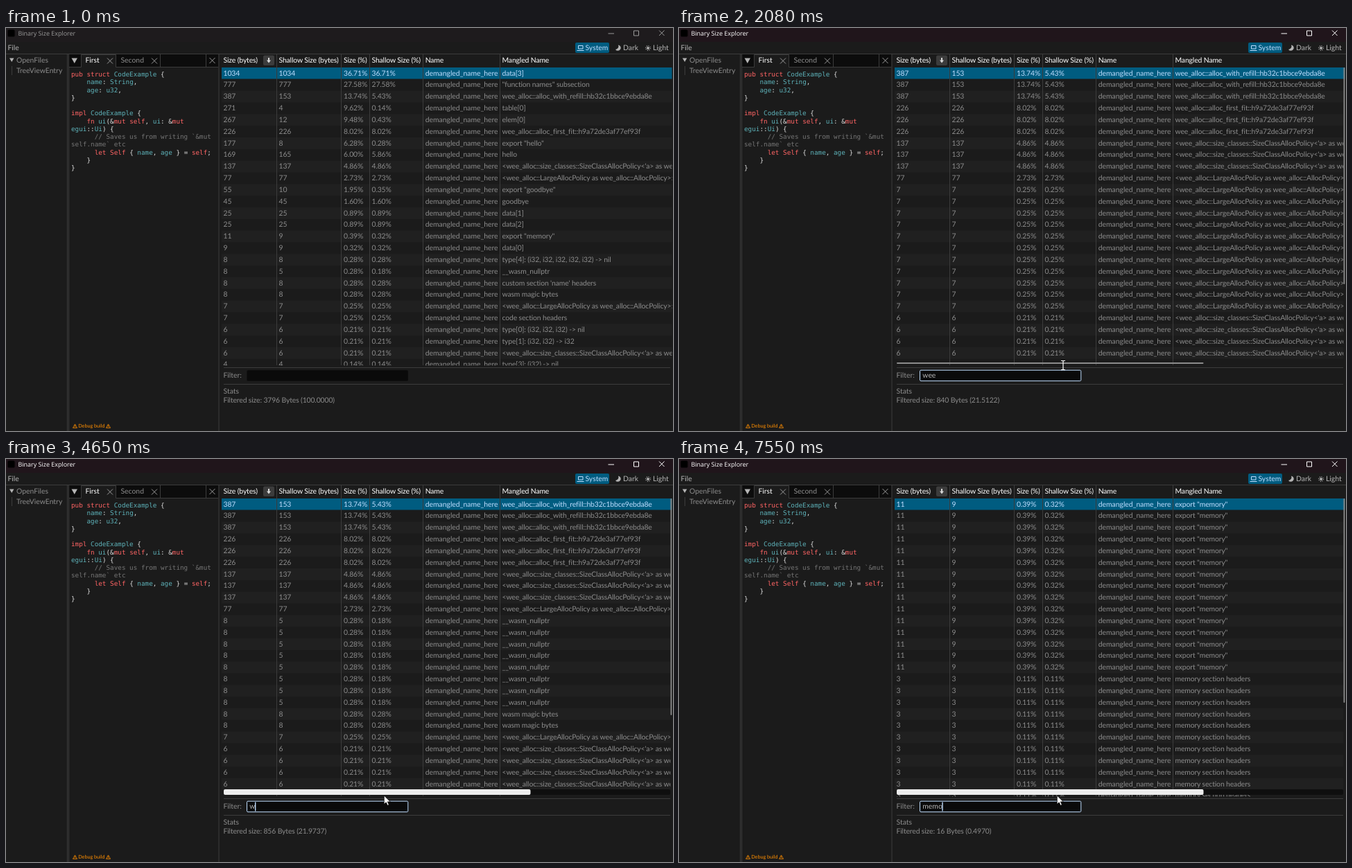
An HTML page for the animation above (8 s loop, 962 px wide and 582 px high).

```html
<!DOCTYPE html>
<html lang="en">
<head>
<meta charset="utf-8">
<title>Binary Size Explorer</title>
<style>
  html, body { margin: 0; width: 100%; height: 100%; overflow: hidden; background: #1b1b1b; }
  svg { display: block; width: 962px; height: 582px; }
  text {
    font: 10.4px Lato, "Open Sans", sans-serif;
    font-variant-ligatures: none;
    letter-spacing: -.13px;
    text-rendering: geometricPrecision;
    white-space: pre;
    fill: #8c8c8c;
  }
  .loose { letter-spacing: 0; }
  .strong { fill: #fff; }
  .soft { fill: #b4b4b4; }
  .picked, .picked text { fill: #c0deff; }
  .line { stroke: #3c3c3c; fill: none; }
  .cross { stroke: #9a9a9a; fill: none; }
  .code text { font: 9.32px "DejaVu Sans Mono", monospace; letter-spacing: 0; fill: #dcdcdc; }
  .code .key { fill: #ff6464; }
  .code .word { fill: #5db1b8; }
  .code .note { fill: #747474; }
  .window text { font: 8.96px "Open Sans", "Noto Sans", sans-serif; letter-spacing: 0; fill: currentColor; }
  .window path { stroke: currentColor; fill: none; }
  .debug text { font-size: 7.2px; letter-spacing: 0; fill: #ff8f00; }
  .debug path { stroke: #ff8f00; stroke-width: .8; fill: none; }
</style>
</head>
<body>
<svg viewBox="0 0 962 582">
  <defs><clipPath id="view"><rect id="viewRect" x="309" y="57" width="651.5" height="430.5"/></clipPath></defs>
  <rect width="962" height="582" fill="#1b1b1b"/>

  <!-- window bar -->
  <rect id="bar" width="962" height="20"/>
  <g id="window" class="window">
    <rect x="2.5" y="2.5" width="10" height="10" rx="1.5" fill="#000"/>
    <text x="17.5" y="11.2">Binary Size Explorer</text>
    <path d="M868.5 8h8.5M905.5 4h7v7h-7zM942 3.500l7.500 7.500M949.500 3.500l-7.500 7.500"/>
  </g>

  <!-- menu -->
  <text class="soft loose" x="2.5" y="32">File</text>
  <rect x="821" y="21" width="49" height="15" rx="2" fill="#005c80"/>
  <path d="M825.5 25.5h6.5v4.500h-6.500zM823.500 32.500h10" stroke="#c0deff" fill="none"/>
  <text class="picked loose" x="835.5" y="32">System</text>
  <path d="M883 24.500a4.200 4.200 0 1 1-4 6.500a4.600 4.600 0 0 0 4-6.500z" fill="#b4b4b4"/>
  <text class="soft loose" x="890" y="32">Dark</text>
  <circle cx="926" cy="29" r="1.9" fill="#b4b4b4"/>
  <circle cx="926" cy="29" r="3.3" fill="none" stroke="#b4b4b4" stroke-width="1.3" stroke-dasharray="1 1.59"/>
  <text class="soft loose" x="933" y="32">Light</text>
  <path class="line" d="M0 37.500H962M88.500 38V582"/>

  <!-- file tree -->
  <path d="M5 43.500h6.500l-3.250 5.500z" fill="#b4b4b4"/>
  <text class="loose" x="15" y="49.6">OpenFiles</text>
  <path class="line" d="M8.500 55V68"/>
  <text class="loose" x="15" y="65">TreeViewEntry</text>

  <!-- tabs and code -->
  <rect x="90" y="38" width="216" height="18" fill="#0c0c0c"/>
  <rect x="109" y="38" width="49" height="19" fill="#1b1b1b"/>
  <path class="line" d="M90 56.500H108.500V38.500H158.500V56.500H306M222.500 38V56M288.500 38V56M307 38V582M90.500 38V582"/>
  <path d="M94.500 43.500h8.500l-4.250 7.500z" fill="#b4b4b4"/>
  <text class="strong loose" x="114.5" y="50.3">First</text>
  <text class="loose" x="165.5" y="50.3">Second</text>
  <path class="cross" d="M146 43.500l8 8M154 43.500l-8 8M210 43.500l8 8M218 43.500l-8 8M293.500 43l8 8M301.500 43l-8 8"/>
  <g id="code" class="code"></g>
  <g class="debug">
    <path d="M99.500 572l3 5.500h-6zM99.500 574v2M147.500 572l3 5.500h-6zM147.500 574v2"/>
    <text x="104.2" y="577.3">Debug build</text>
  </g>

  <!-- table -->
  <g id="stripes" clip-path="url(#view)"></g>
  <rect x="311" y="57" width="649.5" height="16.5" fill="#005c80"/>
  <g id="head"></g>
  <rect x="371" y="39.5" width="16" height="14.5" rx="2" fill="#3c3c3c"/>
  <path d="M378 43h2v3.500h2l-3 4-3-4h2z" fill="#d8d8d8"/>
  <g id="rows" clip-path="url(#view)"></g>
  <path class="line" d="M390.500 38V487M483.500 38V487M524.500 38V487M601.500 38V487M712.500 38V487"/>
  <g id="bars">
    <rect id="vBar" x="958.5" y="57" width="1.8" rx=".9" fill="#8c8c8c"/>
    <rect id="track" x="314" y="477" width="644" height="8" rx="2" fill="#0f0f0f"/>
    <rect id="hBar" x="314" width="442.5"/>
  </g>

  <!-- filter and stats -->
  <path class="line" d="M314 490.500H958M314 514.500H958"/>
  <text class="loose" x="313.5" y="505.2">Filter:</text>
  <rect id="field" x="347.5" y="494.2" width="232.3" height="15.5" rx="1.5" fill="#0a0a0a"/>
  <text id="query" class="soft loose" x="351.3" y="505.2"></text>
  <rect id="caret" y="495.5" width="1.4" height="13" fill="#c0deff"/>
  <text class="loose" x="313.5" y="527.6">Stats</text>
  <text id="stats" x="313.5" y="541.2"></text>

  <!-- pointers, drawn around their hot spots -->
  <path id="arrow" d="M0 0V12.500L2.900 9.800L4.900 14.300L7 13.400L5 9H9z" fill="#fff" stroke="#000" stroke-width=".7"/>
  <path id="beam" d="M-3 -6.500H-.8L0 -5.800L.8 -6.500H3M0 -5.800V5.800M-3 6.500H-.8L0 5.800L.8 6.500H3" fill="none" stroke="#fff" stroke-width="1.2"/>
</svg>
<script>
const LOOP = 8000, PITCH = 16.83, ROWS = 26, TOTAL = 2817, NAME = 4;
const $ = id => document.getElementById(id);
const COLS = [313.5, 393.5, 487, 527.5, 604.7, 715.5];
const HEADS = ['Size (bytes)', 'Shallow Size (bytes)', 'Size (%)', 'Shallow Size (%)', 'Name', 'Mangled Name'];

const CLASSES = "<wee_alloc::size_classes::SizeClassAllocPolicy<'a> as wee_alloc::AllocPolicy>";
const LARGE = '<wee_alloc::LargeAllocPolicy as wee_alloc::AllocPolicy>::new_chunk';
// size, shallow size, mangled name
const ITEMS = `1034 1034 data[3]
777 777 "function names" subsection
387 153 wee_alloc::alloc_with_refill::hb32c1bbce9ebda8e
271 4 table[0]
267 12 elem[0]
226 226 wee_alloc::alloc_first_fit::h9a72de3af77ef93f
177 8 export "hello"
169 165 hello
137 137 ${CLASSES}
77 77 ${LARGE}
55 10 export "goodbye"
45 45 goodbye
25 25 data[1]
25 25 data[2]
11 9 export "memory"
9 9 data[0]
8 8 type[4]: (i32, i32, i32, i32, i32) -> nil
8 5 __wasm_nullptr
8 8 custom section 'name' headers
8 8 wasm magic bytes
7 7 ${LARGE}
7 7 code section headers
6 6 type[0]: (i32, i32, i32) -> nil
6 6 type[1]: (i32, i32) -> i32
6 6 ${CLASSES}
4 4 type[3]: (i32) -> nil
3 3 memory section headers`.split('\n').map(line => {
  const [, size, shallow, name] = line.match(/^(\d+) (\d+) (.*)$/);
  const share = n => (n / TOTAL * 100).toFixed(2) + '%';
  return [size, shallow, share(size), share(shallow), 'demangled_name_here', name];
});

// runs are "item x repeats"
const expand = runs => runs.split(' ').flatMap(run => {
  const [item, n] = run.split('x');
  return Array(+n).fill(ITEMS[item]);
});
const view = (runs, stats, end) => ({ rows: expand(runs), stats, end });
const VIEWS = {
  '': { rows: ITEMS.slice(0, ROWS), stats: '3796 Bytes (100.0000)', end: 352 },
  w: view('2x3 5x3 8x3 9x1 17x8 19x2 20x1 24x4', '856 Bytes (21.9737)', 370),
  we: view('2x3 5x3 8x3 9x1 20x11 24x4', '840 Bytes (21.5122)', 370),
  m: view('1x2 14x9 17x4 18x4 19x3 26x4', '820 Bytes (28.9315)', 352),
  me: view('1x2 14x13 18x4 26x7', '804 Bytes (28.4700)', 352),
  mem: view('14x15 26x11', '16 Bytes (0.4970)', 352)
};
VIEWS.wee = VIEWS.we;
VIEWS.memo = VIEWS.mem;

const QUERY = [[0, ''], [1140, 'w'], [1220, 'we'], [1380, 'wee'], [4340, 'we'], [4650, 'w'], [4810, ''],
  [6290, 'm'], [6370, 'me'], [6450, 'mem'], [6530, 'memo']];
const CARET_FLIPS = [590, 1930, 2480, 2950, 3410, 3870, 4340, 5270, 5820, 7000, 7550];
const BARS = [[0, 'none'], [2080, 'thin'], [2400, 'wide']];
const FIELD = [[0, 'none'], [280, '#969696'], [590, '#c0deff']];
const POINTER = [[0, null], [120, ['arrow', 664, 541]], [200, ['arrow', 602, 515]], [280, ['beam', 552, 503]],
  [2080, ['beam', 554, 487]], [2160, ['beam', 555, 476]], [2240, ['beam', 555, 473]],
  [2320, ['beam', 552, 476]], [2400, ['arrow', 547, 482]], [2480, ['arrow', 545.3, 486]]];
const at = (track, t) => track.findLast(([start]) => start <= t)[1];

function add(parent, tag, attrs, content = '') {
  const node = document.createElementNS('http://www.w3.org/2000/svg', tag);
  for (const key in attrs) node.setAttribute(key, attrs[key]);
  node.textContent = content;
  return parent.appendChild(node);
}
const set = (id, attrs) => { for (const key in attrs) $(id).setAttribute(key, attrs[key]); };
const show = (id, on) => set(id, { visibility: on ? 'visible' : 'hidden' });

const CODE = `pub struct CodeExample {
    name: String,
    age: u32,
}

impl CodeExample {
    fn ui(&mut self, ui: &mut
egui::Ui) {
      // Saves us from writing \`&mut
self.name\` etc
      let Self { name, age } = self;
    }
}`;
const KEYWORD = /^(pub|struct|impl|fn|mut|self|let|Self)$/;
CODE.split('\n').forEach((line, i) => {
  const body = line.trimStart(), note = /`/.test(line);
  const text = add($('code'), 'text', { x: 94 + (line.length - body.length) * 5.61, y: 70.2 + i * 11.23 });
  for (const part of note ? [body] : body.match(/\w+|\W+/g) || []) {
    const kind = note ? 'note' : KEYWORD.test(part) ? 'key' : /\w/.test(part) ? 'word' : '';
    add(text, 'tspan', { class: kind }, part);
  }
});

HEADS.forEach((label, i) => add($('head'), 'text', { class: 'strong', x: COLS[i], y: 50.3 }, label));
for (let i = 2; i < ROWS; i += 2)
  add($('stripes'), 'rect', { x: 311, y: 57 + i * PITCH, width: 649.5, height: PITCH, fill: '#202020' });
const cells = Array.from({ length: ROWS }, (_, i) => {
  const row = add($('rows'), 'g', { class: i ? '' : 'picked' });
  return COLS.map((x, j) => add(row, 'text', { x, y: 68.6 + i * PITCH, class: j === NAME ? 'loose' : '' }));
});

let shown = null;
function fill(query) {
  if (query === shown) return;
  shown = query;
  const { rows, stats, end } = VIEWS[query];
  cells.forEach((row, i) => row.forEach((cell, j) => { cell.textContent = rows[i] ? rows[i][j] : ''; }));
  $('query').textContent = query;
  $('stats').textContent = 'Filtered size: ' + stats;
  set('vBar', { height: end - 57 });
  set('caret', { x: 350.8 + (query ? $('query').getComputedTextLength() : 0) });
}

function draw() {
  const t = performance.now() % LOOP;
  fill(at(QUERY, t));

  const active = t >= 590;
  set('bar', { fill: active ? '#20151b' : '#1e1b1d' });
  set('window', { color: active ? '#fff' : '#999' });
  set('field', { stroke: at(FIELD, t) });
  show('caret', CARET_FLIPS.filter(flip => flip <= t).length % 2);

  const bars = at(BARS, t), wide = bars === 'wide';
  set('bars', { display: bars === 'none' ? 'none' : 'inline' });
  set('track', { display: wide ? 'inline' : 'none' });
  set('hBar', wide ? { y: 477, height: 8, rx: 2, fill: '#ececec' } : { y: 483, height: 2, rx: 1, fill: '#8c8c8c' });
  set('viewRect', { width: bars === 'none' ? 651.5 : 649.3 });

  const pointer = at(POINTER, t);
  for (const id of ['arrow', 'beam']) show(id, pointer && pointer[0] === id);
  if (pointer) set(pointer[0], { transform: `translate(${pointer[1]} ${pointer[2]})` });

  requestAnimationFrame(draw);
}
draw();
</script>
</body>
</html>
```
